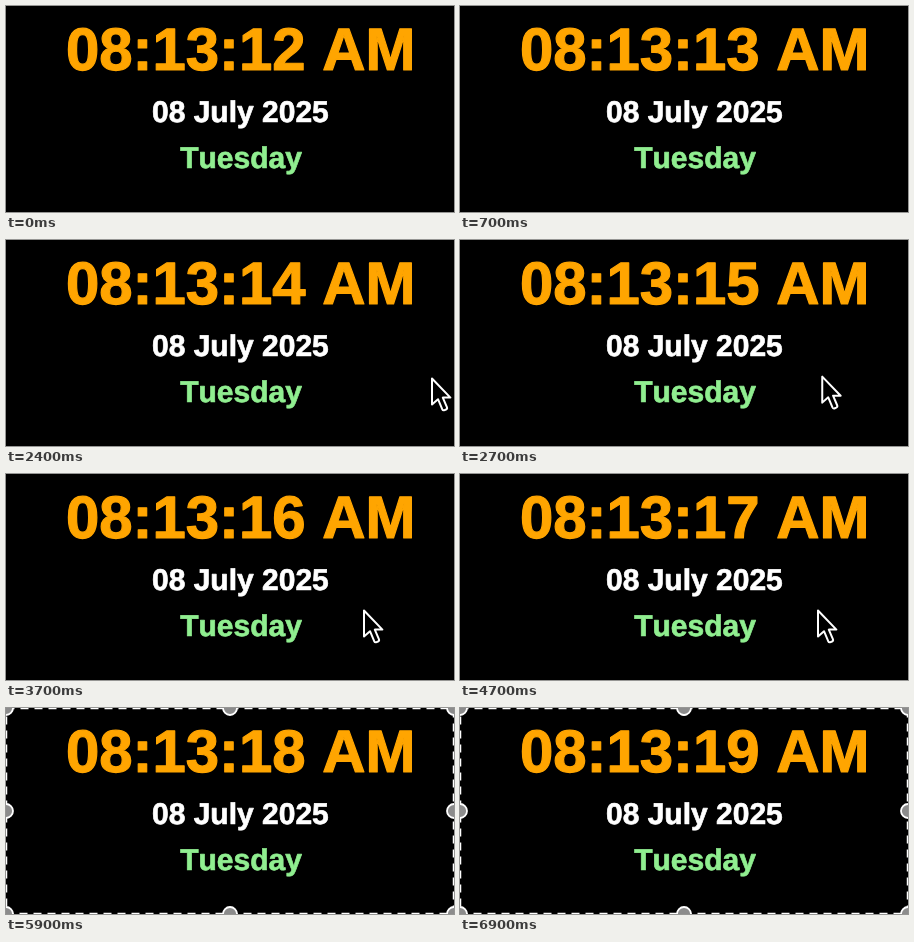
Write an HTML page that moves like this. It is 448 px wide and 206 px high and loops after 7700 ms.

```html
<!DOCTYPE html>
<html lang="en">
<head>
<meta charset="utf-8">
<title>Clock</title>
<style>
  html, body { margin: 0; width: 100%; height: 100%; overflow: hidden; background: #000; }
  svg { display: block; width: 448px; height: 206px; }
  text {
    font-family: "Liberation Sans", Arial, Helvetica, sans-serif;
    font-weight: bold;
    font-kerning: none;
    text-rendering: geometricPrecision;
    text-anchor: middle;
    white-space: pre;
    stroke-linejoin: round;
  }
  #clock { font-size: 59.9px; fill: #ffa500; stroke: #ffa500; stroke-width: 1.2px; }
  .line { font-size: 30px; stroke-width: .7px; }
  .date { fill: #fff; stroke: #fff; }
  .day { fill: #90ee90; stroke: #90ee90; }
</style>
</head>
<body>
<svg viewBox="0 0 448 206">
  <rect width="448" height="206" fill="#000"/>
  <text id="clock" x="234.7" y="64.2">08:13:12 AM</text>
  <text class="line date" x="234.4" y="115.7">08 July 2025</text>
  <text class="line day" x="235" y="161.6">Tuesday</text>

  <g id="frame" visibility="hidden">
    <rect x=".5" y=".5" width="447" height="205" fill="none" stroke="#fff" stroke-width="1.5" stroke-dasharray="8 6"/>
    <g id="knobs" fill="#8c8c8c" stroke="#fff" stroke-width="1.8"></g>
  </g>

  <path id="arrow" visibility="hidden" d="M1 1.5V27.5L7 22.2L11.2 32.2Q12 33.8 13.6 33.1L15 32.5Q16.6 31.7 15.9 30.1L11.8 20.6H19.4Z"
        fill="#000" stroke="#fff" stroke-width="2" stroke-linejoin="round"/>

  <g id="hand" visibility="hidden" fill="#fff" stroke="#fff" stroke-linecap="round" stroke-linejoin="round">
    <path d="M352.5 139.5Q360 137.5 367.5 139.5Q368.5 146 365.5 150Q363 153 359.5 153Q355 153 352.5 148.5Z" stroke-width="1.4"/>
    <path d="M345.4 138.2L353.5 147.5" stroke-width="3.4"/>
    <path d="M350.8 125.6L354.4 141M357 122.8L358.2 141M363.4 123.4L362.6 141M369.8 128.4L366.4 141" stroke-width="3.1" fill="none"/>
  </g>
</svg>
<script>
const LOOP = 7700;
const $ = id => document.getElementById(id);
const clock = $("clock"), frame = $("frame"), arrow = $("arrow"), hand = $("hand");

const ticks = [600, 1700, 2700, 3700, 4700, 5700, 6700];
const SELECT = 4800;
const glide = { from: 2400, to: 2800, a: [425, 137], b: [357, 135] };

for (const x of [0, 224, 448])
  for (const y of [0, 103, 206])
    if (x !== 224 || y !== 103)
      $("knobs").insertAdjacentHTML("beforeend", `<circle cx="${x}" cy="${y}" r="7"/>`);

const show = (el, on) => el.setAttribute("visibility", on ? "visible" : "hidden");

function draw(t) {
  const step = Math.floor(t / 100) * 100;
  const label = `08:13:${12 + ticks.filter(k => t >= k).length} AM`;
  if (clock.textContent !== label) clock.textContent = label;

  const p = Math.min(1, Math.max(0, (step - glide.from) / (glide.to - glide.from)));
  const e = 1 - (1 - p) ** 2;
  const [x, y] = glide.a.map((v, i) => v + (glide.b[i] - v) * e);
  arrow.setAttribute("transform", `translate(${x} ${y})`);

  show(arrow, t >= glide.from && t < SELECT);
  show(frame, t >= SELECT);
  show(hand, t >= SELECT && t < 5100);
}

const start = performance.now();
function tick(now) {
  draw(Math.max(0, now - start) % LOOP);
  requestAnimationFrame(tick);
}
draw(0);
requestAnimationFrame(tick);
</script>
</body>
</html>
```
